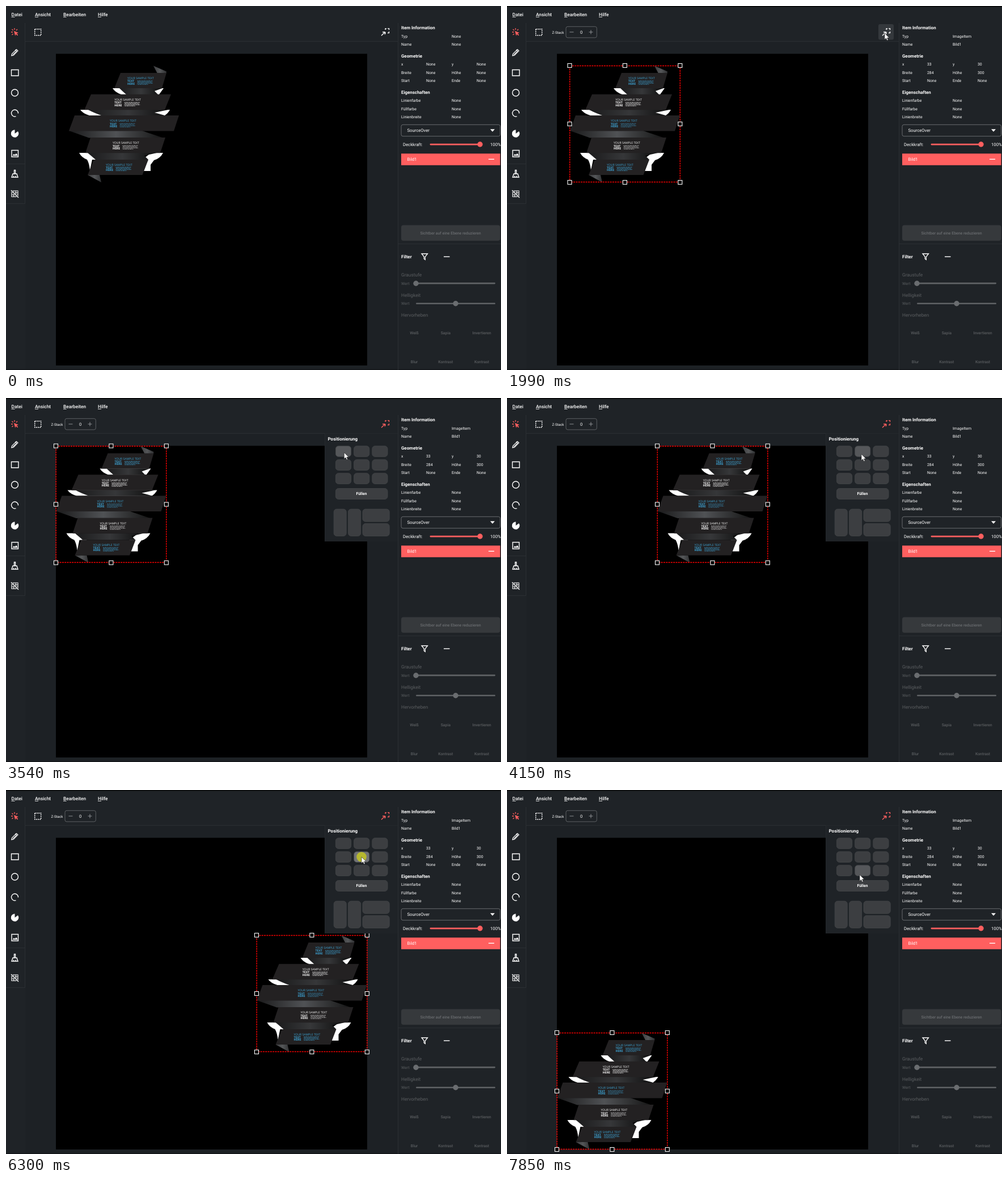
An HTML page for the animation above (8 s loop, 873 px wide and 642 px high).

```html
<!DOCTYPE html>
<html lang="de">
<head>
<meta charset="utf-8">
<title>Positionierung</title>
<style>
html, body { margin: 0; width: 100%; height: 100%; overflow: hidden; background: #1f2327; }
svg { display: block; width: 873px; height: 642px; }
text { font-family: Roboto, sans-serif; text-rendering: geometricPrecision; white-space: pre; }
.art text { font-family: "Open Sans", sans-serif; }
</style>
</head>
<body>
<svg id="stage" viewBox="0 0 873 642" xmlns="http://www.w3.org/2000/svg">
  <defs>
    <linearGradient id="fold"><stop offset="0" stop-color="#1a1a1b"/><stop offset=".5" stop-color="#505255"/><stop offset="1" stop-color="#151515"/></linearGradient>
    <linearGradient id="shade"><stop offset="0" stop-color="#1b1b1c"/><stop offset=".5" stop-color="#363739"/><stop offset="1" stop-color="#0e0e0e"/></linearGradient>
    <linearGradient id="tip"><stop offset="0" stop-color="#3c3d3f"/><stop offset=".5" stop-color="#555759"/><stop offset="1" stop-color="#303133"/></linearGradient>
  </defs>
</svg>
<script>
const NS = 'http://www.w3.org/2000/svg';
const stage = document.getElementById('stage');
const WHITE = '#fff', RED = '#ff5f5f', DIM = '#5b5e61', BG = '#1f2327', EDGE = '#2b2f33', KEY = '#3c3e41';

function add(parent, tag, attrs, content) {
  const el = document.createElementNS(NS, tag);
  for (const k in attrs) el.setAttribute(k, attrs[k]);
  if (content !== undefined) el.textContent = content;
  parent.appendChild(el);
  return el;
}
const group = (parent, attrs) => add(parent, 'g', attrs || {});
const box = (p, x, y, w, h, fill, rx = 0, more) =>
  add(p, 'rect', { x, y, width: w, height: h, fill, rx, ...more });
const line = (p, d, stroke = WHITE, width = 1.4, more) =>
  add(p, 'path', { d, stroke, 'stroke-width': width, fill: 'none', ...more });
const shape = (p, d, fill) => add(p, 'path', { d, fill });
const dot = (p, cx, cy, r, fill) => add(p, 'circle', { cx, cy, r, fill });
// Text centred vertically on cy
const label = (p, x, cy, s, size = 6.9, more) =>
  add(p, 'text', { x, y: cy + size * 0.355, 'font-size': size, fill: WHITE, ...more }, s);
const bold = { 'font-weight': 700 };
const mid = { 'text-anchor': 'middle' };
const show = (el, on) => el.setAttribute('visibility', on ? 'visible' : 'hidden');

// Window frame
const ui = group(stage);
box(ui, 0, 0, 873, 642, BG);
box(ui, 34, 63, 657, 579, '#1d2125');
box(ui, 0, 640.5, 873, 1.5, '#14171a');
const focusLine = box(ui, 0, 0, 873, 1.5, '#050607');
line(ui, 'M33.5 30V348.5H0M0 278.5H33M34 62.5H691M691.5 30V642M692 419.5H873', EDGE, 1);
[['Datei', 9.5, 6], ['Ansicht', 51, 6], ['Bearbeiten', 101, 5.5], ['Hilfe', 162, 6]].forEach(([s, x, w]) => {
  label(ui, x, 15, s, 8.3, { 'font-weight': 500 });
  box(ui, x, 19, w, 0.8, WHITE);
});

// Tool column
line(ui, 'M9 46h3M10.5 41l2 2M15 39v3M20 41l-2 2M10.5 51l2-2', RED, 1.3);
shape(ui, 'M14 44l8 3.2-3.3 1.2 2.6 2.6-1.3 1.3-2.6-2.6-1.2 3z', RED);
line(ui, 'M9.8 87.7l.8-3.4 7.8-7.8 2.6 2.6-7.8 7.8zM12.3 85.8l6-6M16.3 77.2l3.4 3.4', WHITE, 1.2);
line(ui, 'M9.5 112.5h12.5v10.5h-12.5z', WHITE, 1.4);
add(ui, 'circle', { cx: 15.5, cy: 153, r: 6, fill: 'none', stroke: WHITE, 'stroke-width': 1.4 });
line(ui, 'M17.5 194.7A6 6 0 1 1 21.5 189.5', WHITE, 1.4);
shape(ui, 'M15.5 225V218.2A6.8 6.8 0 1 0 21 221z', WHITE);
line(ui, 'M10 254.5h11.5v11.5h-11.5z', WHITE, 1.4);
shape(ui, 'M11.5 264l2.5-3.3 1.7 2 2.3-3 2.8 4.3z', WHITE);
line(ui, 'M14.5 296v-6.5h2v6.5M12 296h7l2 6h-11zM13.5 302v-2.5M17 302v-2.5', WHITE, 1.4);
line(ui, 'M10 326h11v10.5h-11zM10 329.5h11M10 333h11M13.7 326v10.5M17.4 326v10.5', WHITE, 1.1);
line(ui, 'M9 325l13 13', BG, 3);
line(ui, 'M9 325l13 13', WHITE, 1.4);

// Option bar
line(ui, 'M50.7 40.7h11v11h-11z', WHITE, 1.4, { 'stroke-dasharray': '2 1.2' });
const zStack = group(ui);
label(zStack, 79.5, 46.5, 'Z-Stack', 6.2);
box(zStack, 104, 36.3, 54.3, 19.6, 'none', 3, { stroke: '#5d6063' });
line(zStack, 'M110.5 46h7M144.5 46h7M148 42.5v7', '#8c8f92', 1.1);
label(zStack, 131, 46, '0', 7.5, mid);
const popKey = box(ui, 655, 32, 27, 27.5, '#462d32', 3);
const popIcon = line(ui, 'M669 42v-2h2M673 39.7h2.5v2.5M675.5 45v2.5h-2.5M662 52.3l6-6M664 46h4.3v4.3M670 47.5h-1', WHITE, 1.3);

// Information column
[['Item Information', 38.5], ['Geometrie', 88], ['Eigenschaften', 152]]
  .forEach(([s, y]) => label(ui, 697, y, s, 7.9, bold));
// Each field: name, name x, y, value x, value once selected
const fields = [
  ['Typ', 697, 53.3, 786, 'ImageItem'], ['Name', 697, 67.8, 786, 'Bild1'],
  ['x', 697, 102.8, 741, '33'], ['y', 786, 102.8, 830, '30'],
  ['Breite', 697, 117.2, 741, '284'], ['Höhe', 786, 117.2, 830, '300'],
  ['Start', 697, 131.6, 741], ['Ende', 786, 131.6, 830],
  ['Linienfarbe', 697, 166.8, 786], ['Füllfarbe', 697, 181.2, 786], ['Linienbreite', 697, 195.5, 786]
].map(([name, x, y, vx, val = 'None']) => {
  label(ui, x, y, name);
  return { el: label(ui, vx, y, 'None'), val };
});
box(ui, 697, 209.3, 174.5, 20.4, 'none', 3, { stroke: '#686b6e' });
label(ui, 707.5, 219.3, 'SourceOver', 7.7);
shape(ui, 'M854 217.2h8l-4 4.6z', WHITE);
label(ui, 700, 244, 'Deckkraft:', 7.7);
label(ui, 854, 244, '100%', 7.7);
box(ui, 747.5, 242.7, 88, 2.8, RED, 1.4);
dot(ui, 836, 244, 4.7, RED);
box(ui, 697, 260.3, 174.5, 20.5, RED);
label(ui, 707.5, 270.3, 'Bild1', 7.7);
box(ui, 851, 269.6, 10, 1.4, WHITE);
box(ui, 697, 386.5, 174.5, 27.5, '#36393c', 4);
label(ui, 784, 400.5, 'Sichtber auf eine Ebene reduzieren', 6.9, { ...mid, fill: '#6b6e71', 'font-weight': 500 });

// Filter column
label(ui, 697, 442.3, 'Filter', 8, bold);
line(ui, 'M733 437h10.5l-4.2 5.3v5.2l-2-1.5v-3.7z', WHITE, 1.3);
box(ui, 772, 441.5, 10.5, 1.4, WHITE);
[['Graustufe', 474], ['Helligkeit', 509.8], ['Hervorheben', 545.3]]
  .forEach(([s, y]) => label(ui, 697, y, s, 8.3, { fill: DIM }));
[[489.2, 723], [524.8, 793]].forEach(([y, x]) => {
  label(ui, 697, y, 'Wert', 6.9, { fill: DIM });
  box(ui, 723, y - 1.4, 140, 2.6, '#5f6265', 1.3);
  dot(ui, x, y, 4.7, '#6a6d70');
});
[['Weiß', 'Sapia', 'Invertieren'], ['Blur', 'Kontrast', 'Kontrast']].forEach((row, r) =>
  row.forEach((s, c) => label(ui, [720, 775.3, 839][c], 577 + 50.3 * r, s, 6.9,
    { ...mid, fill: DIM, 'font-weight': 500 })));

// Canvas with the ribbon picture
box(stage, 88, 84.3, 549, 549.7, '#000');
const art = group(stage, { class: 'art' });
shape(art, 'M260 105.5L283 115.5 282.5 119H267z', 'url(#tip)');
shape(art, 'M188 145H278L270 156H203Q192 152 188 145z', WHITE);
shape(art, 'M200 145H276L262 150 268 156H212Q205 150 200 145z', 'url(#shade)');
shape(art, 'M131 183H289Q286 189 280 193H147Q136 190 131 183z', WHITE);
shape(art, 'M145 183H286L262 188 280 193H168Q154 188 145 183z', 'url(#shade)');
shape(art, 'M111 220H240L277 232.5H146z', 'url(#fold)');
shape(art, 'M129 259H150L165 271 152 271 148 290Q147 278 143 271 133 267 129 259z', WHITE);
shape(art, 'M277 259H256L240 271H250L243 291H255V280Q258 276 261 272 272 269 277 259z', WHITE);
shape(art, 'M144 259H266L244 264 251 271H158Q150 264 144 259z', 'url(#shade)');
shape(art, 'M144 298H165L168 311z', 'url(#tip)');
// Banner corners: top left, top right, bottom right, bottom left, then text origin
[
  [202, 283, 275, 191, 118, 145, 214, 129.2],
  [150, 291, 280, 138, 155.7, 183.2, 191.3, 167.2],
  [121, 305, 296, 110.8, 193, 220.5, 183, 204.3],
  [149, 281, 272, 140, 232, 259.3, 188, 243.3],
  [155, 251, 240.5, 144, 271, 298, 176, 281.5]
].forEach(([a, b, c, d, top, bottom, x, y], i) => {
  shape(art, `M${a} ${top}H${b}L${c} ${bottom}H${d}z`, '#232122');
  const fill = i % 2 ? WHITE : '#3da5d6';
  const put = (s, dy, size, weight) =>
    add(art, 'text', { x, y: y + dy, 'font-size': size, 'font-weight': weight, fill }, s);
  put('YOUR SAMPLE TEXT', 0, 5.1, 400);
  put('TEXT', 5.2, 5.2, 700);
  put('HERE', 9.3, 5.2, 700);
  for (let k = 0; k < 4; k++)
    line(art, `M${x + 17.5} ${y + 2.9 + 2 * k}h${[27.5, 26, 27.5, 19][k]}`, fill, 1.1,
      { 'stroke-dasharray': '2 .7 3.2 .6 1.2 .6', 'stroke-dashoffset': k * 2.3, opacity: 0.65 });
});

// Selection frame
const frame = group(stage);
box(frame, 110.7, 105.5, 194.6, 205, 'none', 0, { stroke: '#f00', 'stroke-width': 1.4, 'stroke-dasharray': '2.9 1.4' });
for (let i = 0; i < 9; i++) {
  if (i === 4) continue;
  box(frame, 107 + 97.4 * (i % 3), 101.5 + 103 * Math.floor(i / 3), 7, 7, '#000', 0, { stroke: WHITE, 'stroke-width': 1.1 });
}

// Positioning panel
const panel = group(stage);
box(panel, 562, 62.5, 129, 190.5, BG);
line(panel, 'M562.5 63V253', '#24282c', 1);
label(panel, 567.5, 72, 'Positionierung', 8, bold);
const cells = [];
const key = (x, y, w, h) => box(panel, x, y, w, h, KEY, 5, { stroke: '#45474a', 'stroke-width': 0.8 });
for (let i = 0; i < 9; i++) {
  const x = 581.4 + 32.2 * (i % 3), y = 84.7 + 24 * Math.floor(i / 3);
  cells.push({ x, y, el: key(x, y, 27.2, 18.8) });
}
key(581.4, 159.5, 91.6, 19);
label(panel, 627, 169, 'Füllen', 7, { ...mid, ...bold });
key(578.2, 196, 22, 47.4);
key(603.6, 196, 22, 47.4);
key(629, 196, 47.2, 22);
key(629, 221.5, 47.2, 22);

// Pointer
const pointer = group(stage);
const glow = dot(pointer, 0, 0, 8.8, '#b6b82f');
add(pointer, 'path', { d: 'M0 0V11.2L2.6 8.8 4.4 12.8 6.2 12 4.5 8.1H8z', fill: WHITE, stroke: '#222', 'stroke-width': 0.6 });

// Pointer stops: time, x, y
const path = [
  [260, 420, 545], [960, 233, 220], [1200, 233, 220], [1880, 667, 47], [2100, 665, 49],
  [2690, 665, 49], [3060, 595, 96], [3500, 595, 96], [3820, 625, 99], [4160, 625, 99],
  [4430, 657, 97], [5090, 657, 97], [5290, 658.5, 116], [5900, 658.5, 116], [6170, 627, 118],
  [6450, 627, 118], [6710, 597.5, 119], [7170, 597.5, 119], [7440, 597, 145], [7710, 597, 145],
  [7850, 622, 149.5]
];
// Clicks: press, release, then the picture's new place
const clicks = [
  [1020, 1090], [2380, 2450], [3270, 3340, 88, 84.5], [4020, 4090, 265, 84.5],
  [4950, 5020, 442, 84.5], [5690, 5760, 442, 256], [6300, 6370, 265, 256],
  [6970, 7100, 88, 256], [7640, 7710, 88, 428]
];

function pointerAt(t) {
  const i = path.findIndex(p => p[0] > t);
  if (i < 0) return path[path.length - 1].slice(1);
  if (i === 0) return path[0].slice(1);
  const [t0, x0, y0] = path[i - 1], [t1, x1, y1] = path[i];
  const u = (t - t0) / (t1 - t0), e = u * u * (3 - 2 * u);
  return [x0 + (x1 - x0) * e, y0 + (y1 - y0) * e];
}

function draw(t) {
  const [px, py] = pointerAt(t);
  const inside = (x, y, w, h) => px >= x && px <= x + w && py >= y && py <= y + h;
  const pressed = clicks.some(c => t >= c[0] && t < c[1]);
  const selected = t >= clicks[0][1], open = t >= clicks[1][1];

  let x = 110.5, y = 105;
  for (const c of clicks) if (c.length > 2 && t >= c[1]) [, , x, y] = c;
  const move = `translate(${x - 110.5} ${y - 105})`;
  art.setAttribute('transform', move);
  frame.setAttribute('transform', move);

  show(focusLine, t >= 260);
  show(frame, selected);
  show(zStack, selected);
  for (const f of fields) {
    const s = selected ? f.val : 'None';
    if (f.el.textContent !== s) f.el.textContent = s;
  }

  show(panel, open);
  show(popKey, inside(655, 32, 27, 27.5));
  popKey.setAttribute('fill', open ? '#462d32' : '#34383c');
  popIcon.setAttribute('stroke', open ? RED : WHITE);
  for (const c of cells)
    c.el.setAttribute('fill', !inside(c.x, c.y, 27.2, 18.8) ? KEY : pressed ? '#717376' : '#55575a');

  show(pointer, t >= 260);
  glow.setAttribute('r', pressed ? 8.8 : 0);
  pointer.setAttribute('transform', `translate(${px} ${py})`);
}

function tick() {
  draw(performance.now() % 8000);
  requestAnimationFrame(tick);
}
tick();
</script>
</body>
</html>
```
